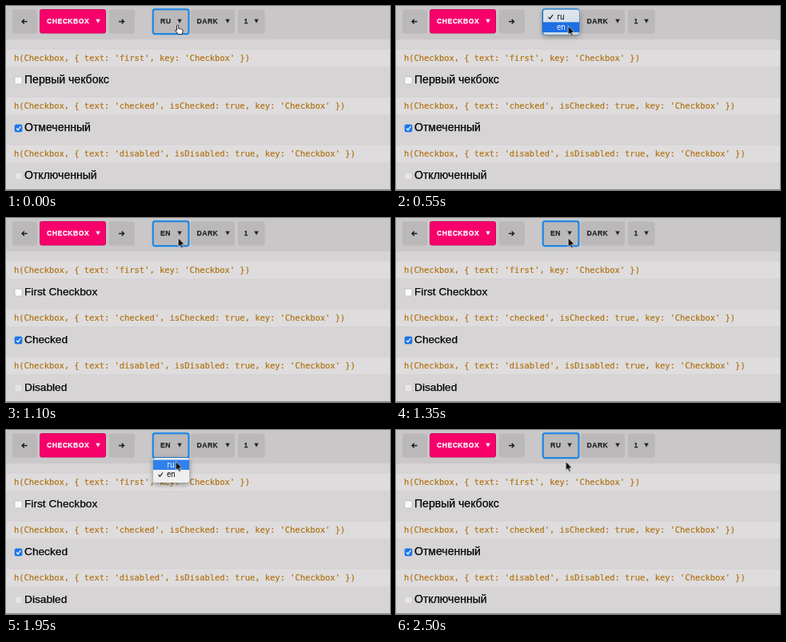
Recreate the animation shown at these times as an HTML page. Size 480 by 231 pixels, loop 2550 ms.

```html
<!DOCTYPE html>
<html lang="en">
<head>
<meta charset="utf-8">
<title>Checkbox playground</title>
<style>
html, body { margin: 0; width: 100%; height: 100%; overflow: hidden; background: #d6d4d5; }
svg { display: block; width: 480px; height: 231px; }

.code { font: 10.43px "DejaVu Sans Mono", monospace; fill: #b07313; stroke: #b07313; stroke-width: .2; }
.label { font: 13.7px "Liberation Sans", Arial, sans-serif; fill: #000; stroke: #000; stroke-width: .25; }
.label.ru { font-size: 14.05px; }
.btn { font: bold 8.6px "Liberation Sans", Arial, sans-serif; letter-spacing: .5px; fill: #222; stroke: #222; stroke-width: .25; }
.btn .light { fill: #fff; stroke: #fff; }
.item { font: 9.2px Inter, sans-serif; fill: #000; }
.lit .item { fill: #fff; }
.lit .tick { stroke: #fff; }
.tick { fill: none; stroke: #111; stroke-width: 1.1; }
.arrow { fill: none; stroke: #1c1c1c; stroke-width: 1.4; }
.menu { filter: drop-shadow(0 2px 3px rgba(0, 0, 0, .4)); }

.anim { animation: 2550ms step-end infinite; }
.ru { animation-name: ru; }
.en { animation-name: en; }
.over { animation-name: over; }
.over .lit { animation-name: over-en; }
.under { animation-name: under; }
.under .lit-en { animation-name: under-en; }
.under .lit-ru { animation-name: under-ru; }
.hand { animation-name: hand; }
.pointer { animation-name: pointer; }

/* Language */
@keyframes ru { 0%, 92.16% { opacity: 1 } 39.22% { opacity: 0 } 100% { opacity: 1 } }
@keyframes en { 0%, 92.16% { opacity: 0 } 39.22% { opacity: 1 } 100% { opacity: 0 } }

/* First menu: opens over the button, blinks, fades */
@keyframes over {
  0% { opacity: 0 }
  5.88% { opacity: 1 }
  35.29% { opacity: 1; animation-timing-function: linear }
  41.18%, 100% { opacity: 0 }
}
@keyframes over-en { 0%, 33.33% { opacity: 1 } 29.41% { opacity: 0 } 100% { opacity: 1 } }

/* Second menu: drops below the button */
@keyframes under {
  0% { opacity: 0 }
  56.86% { opacity: 1 }
  92.16% { opacity: 1; animation-timing-function: linear }
  97.06%, 100% { opacity: 0 }
}
@keyframes under-en { 0% { opacity: 1 } 70.59%, 100% { opacity: 0 } }
@keyframes under-ru { 0%, 88.24% { opacity: 0 } 70.59%, 90.2% { opacity: 1 } 100% { opacity: 1 } }

@keyframes hand { 0% { opacity: 1 } 5.88%, 100% { opacity: 0 } }
@keyframes pointer {
  0% { opacity: 0; transform: translate(215.3px, 25px) }
  5.88% { opacity: 1; transform: translate(215.3px, 25px) }
  54.9% { opacity: 1; transform: translate(215.3px, 25px); animation-timing-function: ease-in-out }
  60.78% { opacity: 1; transform: translate(215.3px, 28px) }
  66.67% { opacity: 1; transform: translate(215.3px, 28px); animation-timing-function: ease-in-out }
  76.47%, 100% { opacity: 1; transform: translate(212.3px, 39.5px) }
}
</style>
</head>
<body>
<svg viewBox="0 0 480 231">
  <defs>
    <linearGradient id="glass" x2="0" y2="1">
      <stop offset="0" stop-color="#dfe6ea"/>
      <stop offset="1" stop-color="#c9dbea"/>
    </linearGradient>
    <path id="caret" d="M-2.5-2.3H2.5L0 2.3Z"/>
    <path id="tick" class="tick" d="M190.5 .2l1.900 2.200 3.600-4.900"/>
  </defs>

  <rect width="480" height="231" fill="#d6d4d5"/>
  <rect width="480" height="42" fill="#c9c7c8"/>
  <g fill="#dedcdd">
    <rect y="55" width="480" height="21"/>
    <rect y="115" width="480" height="21"/>
    <rect y="175" width="480" height="21"/>
  </g>
  <rect y="230" width="480" height="1" fill="#8b898a"/>

  <g class="code">
    <text x="10" y="69">h(Checkbox, { text: 'first', key: 'Checkbox' })</text>
    <text x="10" y="129">h(Checkbox, { text: 'checked', isChecked: true, key: 'Checkbox' })</text>
    <text x="10" y="189">h(Checkbox, { text: 'disabled', isDisabled: true, key: 'Checkbox' })</text>
  </g>

  <g stroke-width=".6">
    <rect x="11" y="89" width="9" height="9" rx="1.8" fill="#fbfafb" stroke="#b0aeaf"/>
    <rect x="11" y="149" width="9" height="9" rx="1.8" fill="#1a76ee" stroke="#1769d6"/>
    <rect x="11" y="209" width="9" height="9" rx="1.8" fill="#e6e4e5" stroke="#c6c4c5"/>
    <path d="M13.100 153.700l1.900 2.100 3.200-4.600" fill="none" stroke="#fff" stroke-width="1.3"/>
  </g>

  <g class="label anim ru">
    <text x="23" y="97">Первый чекбокс</text>
    <text x="23" y="157">Отмеченный</text>
    <text x="23" y="217">Отключенный</text>
  </g>
  <g class="label anim en">
    <text x="23" y="97">First Checkbox</text>
    <text x="23" y="157">Checked</text>
    <text x="23" y="217">Disabled</text>
  </g>

  <g fill="#bab8b9">
    <rect x="8" y="4.500" width="31" height="30" rx="2"/>
    <rect x="42.500" y="4.500" width="82" height="29.500" rx="2" fill="#f7006c" stroke="#d0005c"/>
    <rect x="128.500" y="4.500" width="32.500" height="30" rx="2"/>
    <rect x="183.800" y="4.300" width="44.500" height="30.700" rx="2.500" stroke="#5aa5e6" stroke-opacity=".45" stroke-width="3.500"/>
    <rect x="183.800" y="4.300" width="44.500" height="30.700" rx="2.500" stroke="#1a85e2" stroke-width="1.900"/>
    <rect x="231" y="4.500" width="55" height="30" rx="2"/>
    <rect x="290" y="4.500" width="33.500" height="30" rx="2"/>
  </g>
  <path class="arrow" d="M26.500 19.500H20M22.800 16.700l-2.800 2.800 2.800 2.800M141 19.500h6.500M144.700 16.700l2.800 2.800-2.800 2.800"/>
  <g class="btn">
    <text class="light" x="51" y="22">CHECKBOX</text>
    <text class="anim ru" x="193" y="22">RU</text>
    <text class="anim en" x="193" y="22">EN</text>
    <text x="238.500" y="22">DARK</text>
    <text x="297.500" y="22">1</text>
    <use class="light" href="#caret" x="115" y="19"/>
    <use href="#caret" x="217" y="19"/>
    <use href="#caret" x="277" y="19"/>
    <use href="#caret" x="313" y="19"/>
  </g>

  <g class="menu anim over">
    <rect x="184" y="4.500" width="45" height="31.500" rx="3" fill="url(#glass)"/>
    <use href="#tick" y="13.700"/>
    <text class="item" x="201.500" y="17">ru</text>
    <text class="item" x="201" y="29.500">en</text>
    <g class="lit anim">
      <rect x="184" y="20.300" width="45" height="12.700" fill="#1f6fe5"/>
      <text class="item" x="201" y="29.500">en</text>
    </g>
  </g>

  <g class="menu anim under">
    <rect x="184" y="35" width="45" height="31" rx="3" fill="#f0eff0"/>
    <text class="item" x="201.500" y="47">ru</text>
    <use href="#tick" y="56"/>
    <text class="item" x="201" y="59.300">en</text>
    <g class="lit lit-en anim">
      <rect x="184" y="50" width="45" height="12.500" fill="#2f80ec"/>
      <path class="tick" d="M190.500 56.200l1.900 2.200 3.600-4.900"/>
      <text class="item" x="201" y="59.300">en</text>
    </g>
    <g class="lit lit-ru anim">
      <rect x="184" y="37.500" width="45" height="12.500" fill="#2f80ec"/>
      <text class="item" x="201.500" y="47">ru</text>
    </g>
  </g>

  <path class="hand anim" fill="#fff" stroke="#111" stroke-width=".9" stroke-linejoin="round"
    d="M213.500 24.500q1.200-1.500 2.200 0v4.200q1.100-.9 1.900.3 1.100-.8 1.800.4 1.300-.5 1.600.8v2.500l-1.200 2.800h-4.500l-3.600-4.700q.3-1.500 1.800-.3Z"/>
  <path class="pointer anim" fill="#0a0a0a" stroke="#eee" stroke-width=".7"
    d="M0 0V11.200L2.500 8.900 4.200 12.900 6.100 12.100 4.400 8.200H7.700Z"/>
</svg>
</body>
</html>
```
